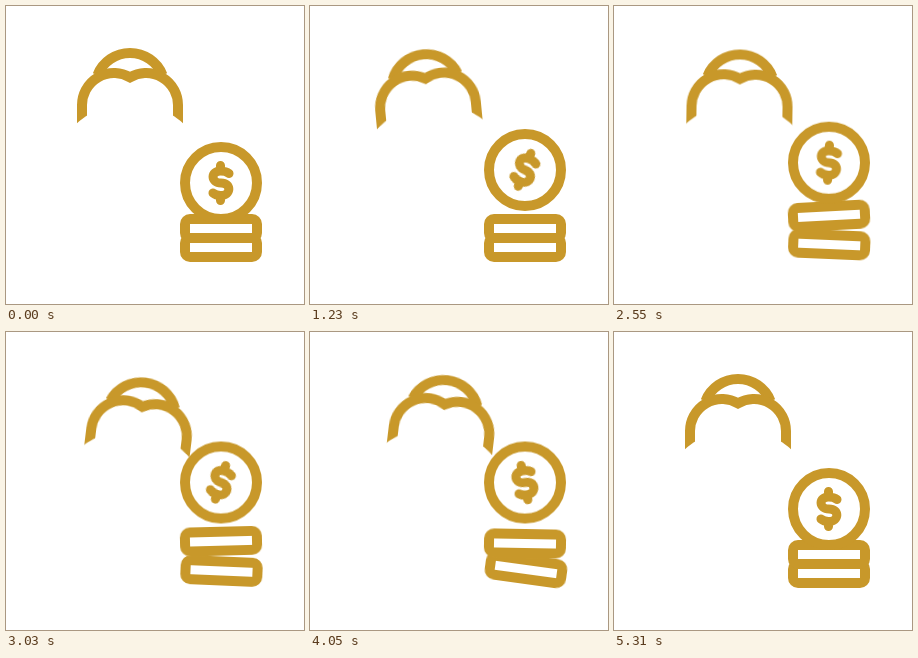
Animation of 298x298 px, one loop 5400 ms. Source, as an HTML page:

```html
<!DOCTYPE html>
<html lang="en">
<head>
<meta charset="utf-8">
<title>Coin stack</title>
<style>
html, body { margin: 0; width: 100%; height: 100%; overflow: hidden; background: #fff; }
svg { display: block; width: 100%; height: 100%; }
.line { fill: none; stroke: #c8982a; stroke-width: 10; }
.blank { fill: #fff; }
.move { animation: 5400ms ease-in-out infinite; }

.head { transform-origin: 124px 130px; animation-name: head; }
.face { animation-name: face; }
.coin { animation-name: coin; }
.sign { transform-origin: 215px 177px; animation-name: sign; }
.upper { transform-origin: 215px 222.5px; animation-name: upper; }
.lower { transform-origin: 215px 241.5px; animation-name: lower; }

@keyframes head {
  0%, 6.11% { transform: translate(0, 0) rotate(0deg); }
  22.78% { transform: translate(-3px, 1px) rotate(-5.5deg); }
  38.33% { transform: translate(-3px, 0) rotate(-5.5deg); }
  56.11% { transform: translate(5.2px, 3px) rotate(7deg); }
  68.89% { transform: translate(5px, -1.5px) rotate(7deg); }
  75% { transform: translate(3.8px, .7px) rotate(6.8deg); }
  84.44% { transform: translate(0, 8px) rotate(0deg); }
  98.33%, 100% { transform: translate(0, 0) rotate(0deg); }
}
@keyframes face {
  0%, 38.33% { transform: translateY(0); }
  56.11%, 75% { transform: translateY(-1.2px); }
  84.44% { transform: translateY(-6.5px); }
  98.33%, 100% { transform: translateY(0); }
}
@keyframes coin {
  0%, 6.11% { transform: translate(0, 0); }
  22.78% { transform: translate(0, -13px); }
  38.33% { transform: translate(0, -14px); }
  56.11%, 75% { transform: translate(0, -26.5px); }
  84.44%, 85.93% { transform: translate(0, -24.7px); }
  92.59% { transform: translate(25px, -14px); }
  98.33%, 100% { transform: translate(0, 0); }
}
@keyframes sign {
  0%, 6.11% { transform: rotate(0deg); }
  22.78% { transform: rotate(21deg); }
  38.33% { transform: rotate(-11deg); }
  56.11% { transform: rotate(17deg); }
  75% { transform: rotate(-11deg); }
  84.44% { transform: rotate(17deg); }
  92.59% { transform: rotate(28deg); }
  98.33%, 100% { transform: rotate(0deg); }
}
@keyframes upper {
  0%, 6.11% { transform: translateY(0) rotate(0deg); }
  11.11% { transform: translateY(-1px) rotate(-1deg); }
  16.11%, 27% { transform: translateY(0) rotate(0deg); }
  38.33% { transform: translateY(-12px) rotate(-4.5deg); }
  56.11% { transform: translateY(-13.3px) rotate(-1.5deg); }
  75% { transform: translateY(-11px) rotate(1deg); }
  84.44% { transform: translateY(-.5px) rotate(-1.2deg); }
  87%, 100% { transform: translateY(0) rotate(0deg); }
}
@keyframes lower {
  0%, 6.11% { transform: translate(0, 0) rotate(0deg); }
  11.11% { transform: translate(0, -1px) rotate(1deg); }
  16.11%, 27% { transform: translate(0, 0) rotate(0deg); }
  38.33% { transform: translate(0, -3.5px) rotate(2.5deg); }
  56.11% { transform: translate(.5px, -2.5px) rotate(2.4deg); }
  75% { transform: translate(1px, -4px) rotate(7.8deg); }
  84.44%, 100% { transform: translate(0, 0) rotate(0deg); }
}
</style>
</head>
<body>
<svg viewBox="0 0 298 298">
  <g class="move head">
    <path class="line" d="M91.5 69A35 35 0 0 1 156.5 69"/>
    <path class="line" d="M76 126V99A32 32 0 0 1 124 71.3A32 32 0 0 1 172 99V126"/>
    <circle class="move face blank" cx="124" cy="177" r="80"/>
  </g>
  <rect class="move lower line" x="179" y="232" width="72" height="19" rx="5"/>
  <rect class="move upper line" x="179" y="213" width="72" height="19" rx="5"/>
  <g class="move coin">
    <circle class="blank" cx="215" cy="177" r="36"/>
    <circle class="line" cx="215" cy="177" r="36"/>
    <path class="move sign line" stroke-linecap="round" stroke-linejoin="round" style="stroke-width:9"
      d="M223 167.5Q220 165 214.5 165C204.5 165 204.5 177 215 177C225.5 177 225.5 189.5 214.5 189.5Q210 189.5 207 187M214.5 159.5V165M214.5 189.5V194.5"/>
  </g>
</svg>
</body>
</html>
```
